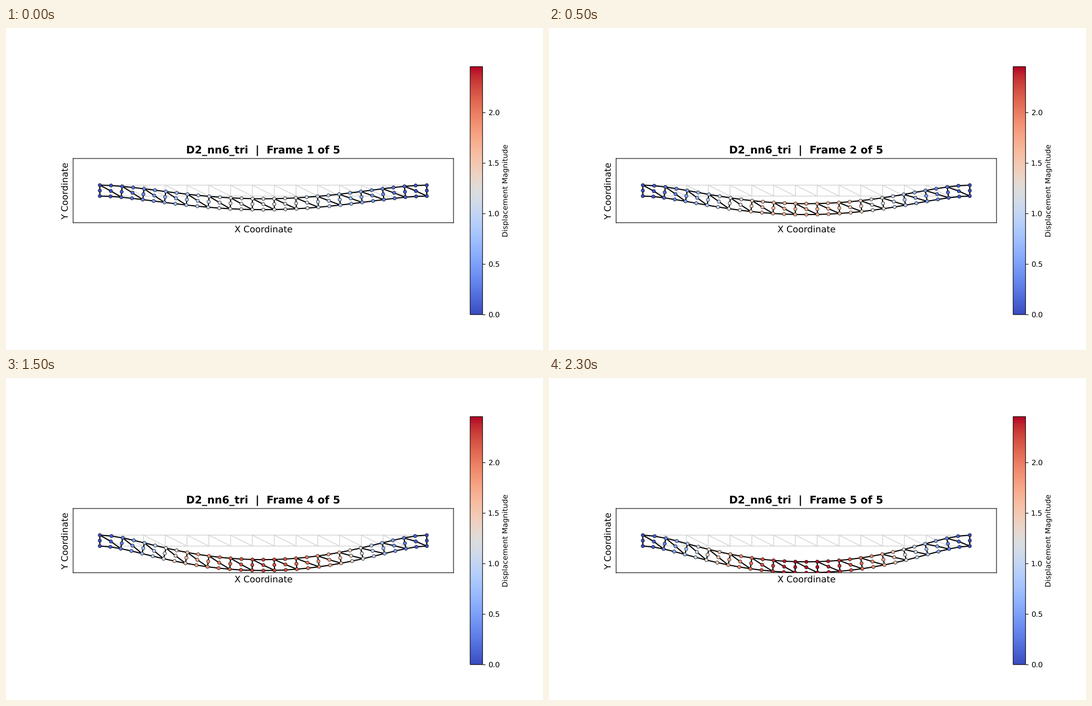
Recreate the animation shown at these times as a matplotlib script. Size 966x580 px, loop 2.5 s.

```python
import numpy as np
import matplotlib.pyplot as plt
from matplotlib.animation import FuncAnimation

DPI = 96.6
STEPS = 5
SPAN = 30        # beam length; depth is 1
PEAK = 2.45      # midspan sag under full load
SHEAR = 0.04     # share of the sag that comes from shear

plt.rcParams.update({
    "font.family": "DejaVu Sans",
    "path.snap": False,
    "text.hinting": "none",
})

stations = np.arange(SPAN + 1)
levels = np.array([0, 0.5, 1])


def midspan_sag(load):
    """Stiffening beam: load grows with sag plus a cubic term."""
    sag = np.linspace(0, PEAK, 2000)
    curve = 0.0726 * sag + 0.0559 * sag**3
    return np.interp(load, curve / curve[-1], sag)


def deform(sag):
    """Node positions of a clamped beam whose tension grows with its sag."""
    xi = np.linspace(0, 1, 20 * SPAN + 1)
    k = 6 * sag
    half = np.sinh(k / 2)
    bend = xi * (1 - xi) - (np.cosh(k / 2) - np.cosh(k * (xi - 0.5))) / (k * half)
    turn = 1 - 2 * xi - np.sinh(k * (0.5 - xi)) / half
    v = sag * ((1 - SHEAR) * bend / bend.max() + SHEAR * 4 * xi * (1 - xi))
    angle = np.arctan(sag * (1 - SHEAR) * turn / bend.max() / SPAN)

    # Even stretch along the beam, less the shortening from its slope
    slope = np.gradient(v, xi * SPAN)
    strain = slope**2 / 2
    ds = SPAN / (len(xi) - 1)
    used = np.concatenate([[0], np.cumsum((strain[1:] + strain[:-1]) / 2 * ds)])
    u = used[-1] * xi - used

    u, v, angle = (a[::20, None] for a in (u, v, angle))
    arm = levels - 0.5
    x = stations[:, None] + u + arm * np.sin(angle)
    y = 0.5 - v + arm * np.cos(angle)
    return x, y


# Members as (station indices, level indices)
members = [(stations, np.full(SPAN + 1, row)) for row in (0, 2)]
members += [(np.full(3, s), np.arange(3)) for s in range(0, SPAN + 1, 2)]
members += [(np.arange(s, s + 3), np.array([2, 1, 0])) for s in range(0, SPAN, 2)]

x0, y0 = np.meshgrid(stations, levels, indexing="ij")

fig, ax = plt.subplots(figsize=(966 / DPI, 580 / DPI), dpi=DPI)
ax.set_aspect("equal")
ax.set_xlim(-PEAK, SPAN + PEAK)
ax.set_ylim(-PEAK, 1 + PEAK)
ax.set_xticks([])
ax.set_yticks([])
ax.set_xlabel("X Coordinate", fontsize=12)
ax.set_ylabel("Y Coordinate", fontsize=12)
title = ax.set_title("", fontsize=14, fontweight="bold")

for m in members:
    ax.plot(x0[m], y0[m], color="lightgray", lw=1, zorder=1)
bars = [ax.plot([], [], color="black", lw=1.5, zorder=2)[0] for _ in members]
nodes = ax.scatter(x0.ravel(), y0.ravel(), c=np.zeros(x0.size), s=20,
                   cmap="coolwarm", vmin=0, vmax=PEAK,
                   edgecolors="black", linewidths=0.5, zorder=3)
fig.colorbar(nodes, ax=ax, fraction=0.046, pad=0.04, label="Displacement Magnitude")


def update(i):
    x, y = deform(midspan_sag((i + 1) / STEPS))
    for bar, m in zip(bars, members):
        bar.set_data(x[m], y[m])
    nodes.set_offsets(np.column_stack([x.ravel(), y.ravel()]))
    nodes.set_array(np.hypot(x - x0, y - y0).ravel())
    title.set_text(f"D2_nn6_tri  |  Frame {i + 1} of {STEPS}")
    return [*bars, nodes, title]


anim = FuncAnimation(fig, update, frames=STEPS, interval=500,
                     repeat=True, repeat_delay=0)
plt.show()
```
